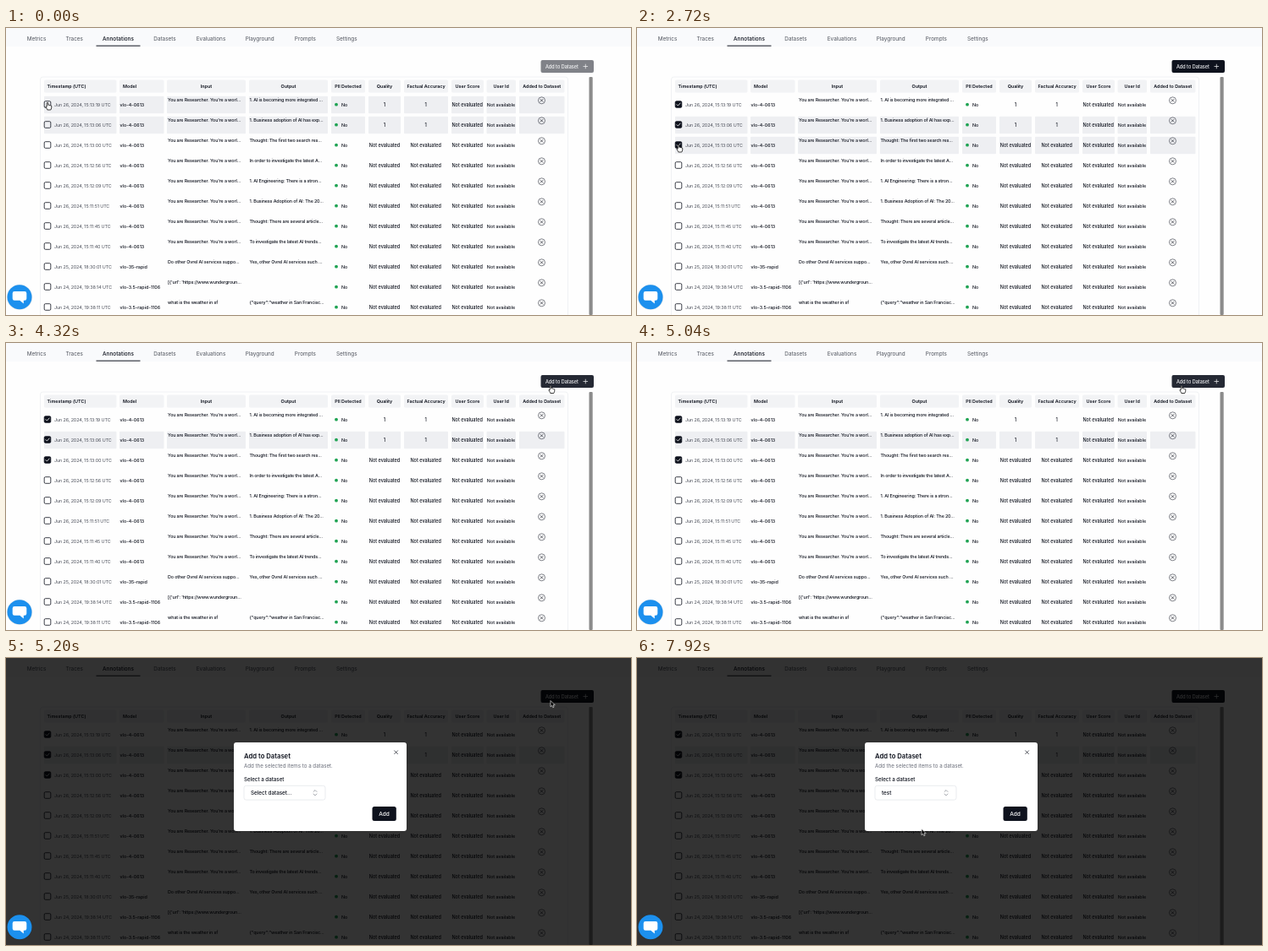
An HTML page that plays this animation: 738 by 340 pixels, repeating every 8000 ms.

```html
<!DOCTYPE html>
<html lang="en">
<head>
<meta charset="utf-8">
<title>Add annotations to a dataset</title>
<style>
  html, body { margin: 0; width: 100%; height: 100%; overflow: hidden; background: #fff; }
  svg { display: block; width: 100vw; height: 100vh; }
  text { font-family: Inter, "Open Sans", sans-serif; white-space: pre; }
</style>
</head>
<body>
<svg id="stage" viewBox="0 0 738 340"></svg>
<script>
const LOOP = 8000, INK = '#0e121d', ROW_H = 24, FIRST_ROW = 90.5;
const stage = document.getElementById('stage');

function add(parent, tag, attrs, text) {
  const node = document.createElementNS('http://www.w3.org/2000/svg', tag);
  for (const key in attrs) node.setAttribute(key, attrs[key]);
  if (text !== undefined) node.textContent = text;
  parent.appendChild(node);
  return node;
}
const group = (parent, attrs = {}) => add(parent, 'g', attrs);
const box = (parent, x, y, width, height, fill, more = {}) =>
  add(parent, 'rect', { x, y, width, height, fill, ...more });
const line = (parent, d, stroke = INK, width = 0.7, more = {}) =>
  add(parent, 'path', { d, stroke, fill: 'none', 'stroke-width': width, 'stroke-linecap': 'round', 'stroke-linejoin': 'round', ...more });
const label = (parent, x, y, size, text, more = {}) =>
  add(parent, 'text', { x, y, 'font-size': size, 'font-weight': 500, fill: INK, ...more }, text);
const centred = { 'text-anchor': 'middle' };
const plus = (parent, x, y, r, color) =>
  line(parent, `M${x - r} ${y}H${x + r}M${x} ${y - r}V${y + r}`, color);
const cross = (parent, x, y, r, width) =>
  line(parent, `M${x - r} ${y - r}L${x + r} ${y + r}M${x + r} ${y - r}L${x - r} ${y + r}`, INK, width);

// Page and navigation
const page = group(stage);
box(page, 0, 0, 738, 340, '#fefefe');
box(page, 0, 0, 738, 22, '#f9fafc');
const tabs = [['Metrics', 36], ['Traces', 80.7], ['Annotations', 132.5], ['Datasets', 187.5],
  ['Evaluations', 242], ['Playground', 299.7], ['Prompts', 353.4], ['Settings', 402.3]];
for (const [name, x] of tabs) {
  const active = name === 'Annotations';
  label(page, x, 15.3, 6.4, name, { ...centred, fill: active ? INK : '#50545d', 'font-weight': active ? 500 : 400 });
}
box(page, 106.5, 20.6, 52, 1, INK);

const addButton = group(page);
const addFill = box(addButton, 631.5, 38, 62.5, 15, INK, { rx: 2 });
label(addButton, 637, 47.5, 5.5, 'Add to Dataset', { fill: '#f4f5f7' });
plus(addButton, 684.3, 45.5, 2.4, '#f4f5f7');

// Table
box(page, 40.5, 58, 623, 300, 'none', { rx: 3, stroke: '#eceef1', 'stroke-width': 0.8 });
box(page, 688.5, 58, 4.2, 282, '#8b8b8b', { rx: 1 });

const columns = [[45, 130.5, 'Timestamp (UTC)'], [134, 186.5, 'Model'], [190, 283, 'Input'],
  [287, 380, 'Output'], [384, 424, 'PII Detected'], [428, 466, 'Quality'], [470, 522, 'Factual Accuracy'],
  [526, 564, 'User Score'], [567.5, 602, 'User Id'], [606, 659.5, 'Added to Dataset']];
columns.forEach(([x, end, name], i) => {
  box(page, x, 61.5, end - x, 15, '#f2f3f5', { rx: 1.5 });
  const at = i === 0 ? 48.5 : i === 1 ? 138 : (x + end) / 2;
  label(page, at, 71, 5.4, name, { 'font-weight': 600, ...(i > 1 ? centred : {}) });
});

const RESEARCH = "You are Researcher. You're a worl...";
const rows = [
  ['26', '15:13:19', 'vlo-4-0613', RESEARCH, '1. AI is becoming more integrated ...'],
  ['26', '15:13:06', 'vlo-4-0613', RESEARCH, '1. Business adoption of AI has exp...'],
  ['26', '15:13:00', 'vlo-4-0613', RESEARCH, 'Thought: The first two search res...'],
  ['26', '15:12:56', 'vlo-4-0613', RESEARCH, 'In order to investigate the latest A...'],
  ['26', '15:12:09', 'vlo-4-0613', RESEARCH, '1. AI Engineering: There is a stron...'],
  ['26', '15:11:51', 'vlo-4-0613', RESEARCH, '1. Business Adoption of AI: The 20...'],
  ['26', '15:11:45', 'vlo-4-0613', RESEARCH, 'Thought: There are several article...'],
  ['26', '15:11:40', 'vlo-4-0613', RESEARCH, 'To investigate the latest AI trends...'],
  ['25', '18:30:01', 'vlo-35-rapid', 'Do other Ovrel AI services suppo...', 'Yes, other Ovrel AI services such ...'],
  ['24', '19:38:14', 'vlo-3.5-rapid-1106', "[{'url': 'https://www.wundergroun...", ''],
  ['24', '19:38:11', 'vlo-3.5-rapid-1106', 'what is the weather in sf', '{"query":"weather in San Francisc...']
];

const views = rows.map(([day, time, model, input, output], i) => {
  const y = FIRST_ROW + ROW_H * i, base = y + 2;
  const shade = group(page);
  for (const [x, end] of columns) box(shade, x, y - 9.7, end - x, 20.5, '#eeeff2', { rx: 1 });
  const check = box(page, 45.2, y - 3.8, 7.6, 7.6, 'none', { rx: 1.3, stroke: INK, 'stroke-width': 0.8 });
  const tick = line(page, `M47 ${y + 0.1}l1.4 1.5 2.7-3.1`, '#fff', 0.8);
  label(page, 57, base, 5.4, `Jun ${day}, 2024, ${time} UTC`, { fill: '#4a4e59', 'font-weight': 400, 'letter-spacing': -0.1 });
  label(page, 134.5, base, 5.4, model);
  label(page, 191, y - 3.6, 5.4, input, { 'letter-spacing': -0.15 });
  label(page, 287.5, y - 3.6, 5.4, output, { 'letter-spacing': -0.15 });
  add(page, 'circle', { cx: 390, cy: y + 0.2, r: 1.9, fill: '#1fa353' });
  label(page, 396, base, 5.4, 'No');
  const score = i < 2 ? '1' : 'Not evaluated';
  label(page, 447, base, 5.5, score, centred);
  label(page, 495.7, base, 5.5, score, centred);
  label(page, 544.7, base, 5.5, 'Not evaluated', centred);
  label(page, 584.5, base, 5.4, 'Not available', centred);
  add(page, 'circle', { cx: 632.5, cy: y - 4.7, r: 4, fill: 'none', stroke: '#3b3f49', 'stroke-width': 0.65 });
  cross(page, 632.5, y - 4.7, 1.4, 0.65);
  return { shade, check, tick };
});

const overlay = box(stage, 0, 0, 738, 340, '#000');

// Dialog
const dialog = group(stage);
box(dialog, 269, 100, 204, 105, '#fff', { rx: 3 });
label(dialog, 281, 119, 7.7, 'Add to Dataset', { 'font-weight': 600 });
label(dialog, 281, 130.3, 6.2, 'Add the selected items to a dataset.', { fill: '#676b77', 'font-weight': 400 });
label(dialog, 281, 146.2, 6.2, 'Select a dataset');
const select = box(dialog, 281, 151.3, 96, 16.8, '#fff', { rx: 2.5, stroke: '#e1e4e9', 'stroke-width': 0.7 });
const choice = label(dialog, 289, 161.8, 6.3, '');
line(dialog, 'M363.1 158.4l1.9-1.9 1.9 1.9M363.1 161l1.9 1.9 1.9-1.9', '#70747e', 0.65);
box(dialog, 432.5, 176, 28.3, 17, INK, { rx: 2.5 });
label(dialog, 446.6, 186.9, 6.5, 'Add', { ...centred, fill: '#fff' });
cross(dialog, 460.6, 111.7, 1.9, 0.7);

// Dataset list
const popover = group(stage);
box(popover, 281, 168.7, 96, 64.3, '#fff', { rx: 2.5, stroke: '#e1e4e9', 'stroke-width': 0.7 });
add(popover, 'circle', { cx: 290.6, cy: 180, r: 2, fill: 'none', stroke: '#777b85', 'stroke-width': 0.6 });
line(popover, 'M292.1 181.5l1.5 1.5', '#777b85', 0.6);
box(popover, 298.7, 171, 71.7, 18.4, '#fff', { rx: 2, stroke: '#1f55c4', 'stroke-width': 1.4 });
label(popover, 304.5, 182.4, 6.1, 'Search dataset...', { fill: '#656a76', 'font-weight': 400 });
box(popover, 283, 192.3, 91.5, 15, '#f0f2f5', { rx: 1.5 });
label(popover, 299, 202.1, 6.1, 'test', { 'font-weight': 400 });
label(popover, 295, 221.2, 6, 'Create Dataset', { 'font-weight': 600 });
plus(popover, 348, 219.2, 2.2, INK);

// Chat button
add(stage, 'circle', { cx: 16, cy: 319, r: 15, fill: '#000', opacity: 0.1 });
add(stage, 'circle', { cx: 16, cy: 318.7, r: 14.5, fill: '#1c90ee' });
add(stage, 'path', { d: 'M10 312H22Q24.3 312 24.3 314.3V320.5Q24.3 322.8 22 322.8H20.8V326.4L16.3 322.8H10Q7.7 322.8 7.7 320.5V314.3Q7.7 312 10 312Z', fill: '#fff' });

// Pointer, with its tip at the origin
const pointer = group(stage);
const arrow = add(pointer, 'path', { d: 'M0 0V7.2L1.7 5.7L2.8 8.2L4.1 7.6L3 5.2H5.2Z', fill: '#000', stroke: '#fff', 'stroke-width': 0.6 });
const hand = add(pointer, 'path', {
  d: 'M-.8.8Q0-.6.8.8V3.4Q1.6 2.7 2.2 3.6Q3.1 3 3.6 4Q4.7 3.6 4.8 4.9Q5 7 3.8 9H-.2Q-1-.4 -.2 7.6L-2 5.6Q-2.2 4.4-.8 5.2Z'.replace('Q-1-.4 -.2 7.6', 'Q-.3 8.2-.8 7.5'),
  fill: '#fff', stroke: '#000', 'stroke-width': 0.75, 'stroke-linejoin': 'round'
});

// Timing
const checkedAt = [450, 1500, 2480];
const openAt = 5045, listAt = 6270, pickAt = 7320, FADE = 150;
const path = [[0, 49, 88], [700, 49, 88], [1250, 49, 113], [1700, 49, 113], [2200, 49, 138], [2950, 49, 138],
  [3850, 643, 50.5], [5300, 643, 50.5], [6000, 332, 158], [6700, 332, 158], [7050, 336, 202.5], [LOOP, 336, 202.5]];
const handTimes = [[0, 850], [1100, 1850], [2050, 3050], [3760, openAt], [5920, 6860]];

const clamp = v => Math.max(0, Math.min(1, v));
const easeOut = u => 1 - Math.pow(1 - clamp(u), 2.3);
const smooth = u => u * u * (3 - 2 * u);
const mix = (a, b, p) => a + (b - a) * p;
const show = (node, on) => node.setAttribute('display', on ? 'inline' : 'none');

function pointerAt(t) {
  const i = path.findIndex(key => key[0] > t);
  const [t0, x0, y0] = path[i - 1], [t1, x1, y1] = path[i];
  const p = smooth((t - t0) / (t1 - t0));
  return [mix(x0, x1, p), mix(y0, y1, p)];
}

function draw(t) {
  const [x, y] = pointerAt(t);
  const opened = t >= openAt;
  const hovered = !opened && x < 663 && y > 79 ? Math.floor((y - 79) / ROW_H) : -1;
  views.forEach(({ shade, check, tick }, i) => {
    const checked = t >= checkedAt[i];
    show(shade, i === 1 || i === hovered);
    show(tick, checked);
    check.setAttribute('fill', checked ? INK : 'none');
  });

  addButton.setAttribute('opacity', mix(0.52, 1, easeOut((t - checkedAt[0]) / FADE)));
  const over = x > 631.5 && y < 53.5 && !opened;
  addFill.setAttribute('fill', over ? '#252934' : INK);

  const p = easeOut((t - openAt) / FADE), scale = mix(0.95, 1, p);
  overlay.setAttribute('opacity', 0.8 * p);
  dialog.setAttribute('opacity', p);
  dialog.setAttribute('transform', `translate(371 152.5) scale(${scale}) translate(-371 -152.5)`);

  const onSelect = opened && x > 281 && x < 377 && y > 151 && y < 168;
  select.setAttribute('fill', onSelect ? '#eff1f4' : '#fff');
  choice.textContent = t >= pickAt ? 'test' : 'Select dataset...';

  const list = easeOut((t - listAt) / FADE) * (1 - easeOut((t - pickAt) / FADE));
  popover.setAttribute('opacity', list);
  popover.setAttribute('transform', `translate(329 168.7) scale(${mix(0.95, 1, list)}) translate(-329 -168.7)`);

  const pointing = handTimes.some(([from, to]) => t >= from && t < to);
  show(hand, pointing);
  show(arrow, !pointing);
  pointer.setAttribute('transform', `translate(${x} ${y})`);
}

const start = performance.now();
function tick(now) {
  draw(Math.max(0, now - start) % LOOP);
  requestAnimationFrame(tick);
}
draw(0);
requestAnimationFrame(tick);
</script>
</body>
</html>
```
